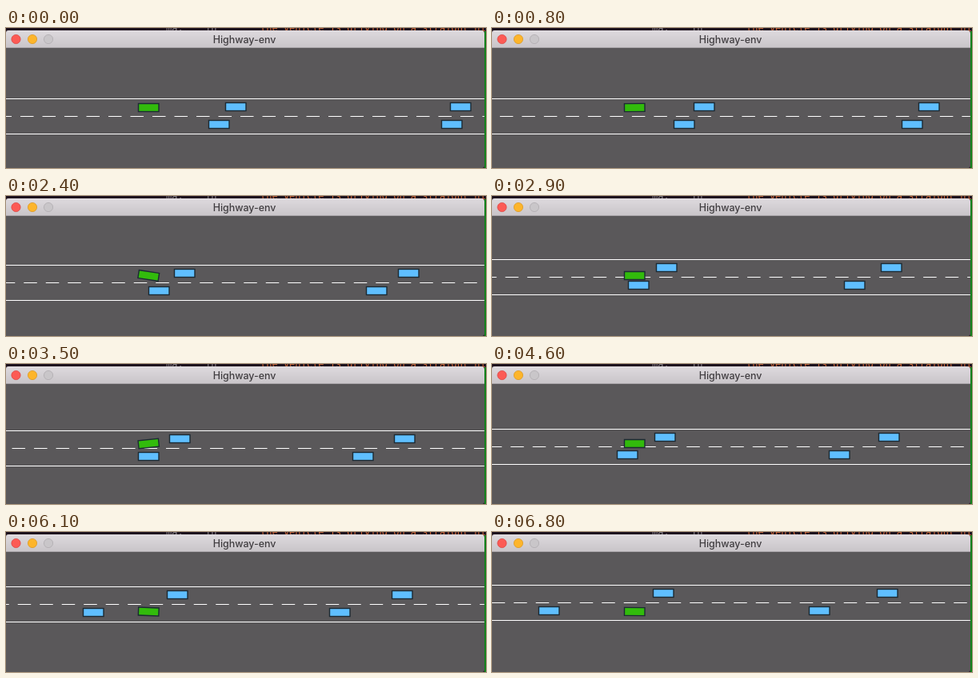
These frames come from a looping animation (600x175 px, 6900 ms). An HTML page with a canvas:

```html
<!DOCTYPE html>
<html lang="en">
<head>
<meta charset="utf-8">
<title>Highway-env</title>
<style>
html, body { margin: 0; width: 100%; height: 100%; overflow: hidden; background: #5a585a; }
canvas { display: block; }
</style>
</head>
<body>
<canvas id="stage" width="600" height="175"></canvas>
<script>
const ctx = document.getElementById('stage').getContext('2d');
const LOOP = 6900, STEP = 100;
const LANE = 22, CAR_W = 26.5, CAR_H = 11, ROAD_W = 598;
const DASH = 16.5, PERIOD = 27.5;
const CRUISE = 64, STEER = 0.55;

// Soft ramp: flat before `start`, slope 1 after it.
const ramp = (t, start) => 0.15 * Math.log(1 + Math.exp((t - start) / 0.15));

function ease(t, a, b) {
  const u = Math.min(1, Math.max(0, (t - a) / (b - a)));
  return u * u * (3 - 2 * u);
}

// Critically damped approach from 0 to 1.
function settle(t, start, tau) {
  const s = Math.max(0, t - start) / tau;
  return 1 - (1 + s) * Math.exp(-s);
}

// The ego car slows to the pace of the traffic ahead.
const braking = t => ramp(t, 2.5);
const travel = t => 78.9 * t - 18.2 * braking(t);
const upperX = t => 274 - 27.5 * t + 26.4 * braking(t);
const traffic = [
  { lane: 0, x: upperX },
  { lane: 0, x: t => upperX(t) + 280.5 },
  { lane: 1, x: t => 253 - 32 * t + 24 * braking(t) - 46.3 * ramp(t, 5.06) },
  { lane: 1, x: t => 544 - 40 * t + 28.9 * braking(t) }
];

// Swerve right, back left, right again, then settle in the lower lane.
const roadTop = t => 88 + ease(t, 0.2, 1.5)
  - 10 * ease(t, 2.1, 2.9) + 8 * ease(t, 3, 4)
  - 6 * ease(t, 4, 4.6) - 15 * settle(t, 4.85, 0.35);

function heading(t) {
  const slope = (roadTop(t + 0.01) - roadTop(t - 0.01)) / 0.02;
  return -STEER * slope / CRUISE;
}

function rect(color, x, y, w, h) {
  ctx.fillStyle = color;
  ctx.fillRect(x, y, w, h);
}

function panel(fill, y, h, radii) {
  ctx.fillStyle = fill;
  ctx.beginPath();
  ctx.roundRect(0, y, ROAD_W, h, radii);
  ctx.fill();
}

function carBody(color, x, y) {
  rect(color, x + 0.5, y + 0.5, CAR_W - 1, CAR_H - 1);
  ctx.strokeStyle = '#1c2a33';
  ctx.lineWidth = 1.4;
  ctx.strokeRect(x + 0.5, y + 0.5, CAR_W - 1, CAR_H - 1);
}

function button(x, fill, edge) {
  ctx.beginPath();
  ctx.arc(x, 14, 5.6, 0, 7);
  ctx.fillStyle = fill;
  ctx.fill();
  ctx.strokeStyle = edge;
  ctx.lineWidth = 0.8;
  ctx.stroke();
}

function drawDesktop() {
  rect('#1d111d', 0, 0, 600, 175);
  ctx.font = '12px "DejaVu Sans Mono", monospace';
  ctx.textAlign = 'left';
  ctx.fillStyle = '#8b858b';
  ctx.fillText('ma:', 200, 4);
  ctx.fillText('in', 249, 4);
  ctx.fillStyle = '#cf6a3a';
  ctx.fillText('the vehicle is driving on a straight hi', 318, 4);
  rect('#12801a', 598, 4, 2, 171);
}

function drawWindow() {
  const bar = ctx.createLinearGradient(0, 3, 0, 25);
  bar.addColorStop(0, '#dedade');
  bar.addColorStop(1, '#c8c4c8');
  panel(bar, 3, 30, [3, 4, 0, 0]);
  panel('#5a585a', 25, 150, [0, 0, 3, 0]);
  rect('#a9a5a9', 0, 24, ROAD_W, 1);
  button(12.5, '#fc5b55', '#de4542');
  button(33, '#fdb52b', '#dc9a24');
  button(53, '#c9c6c9', '#b0adb0');
  ctx.font = '500 12.4px Inter, sans-serif';
  ctx.textAlign = 'center';
  ctx.fillStyle = '#403d40';
  ctx.fillText('Highway-env', 298, 19);
}

function drawRoad(t) {
  const top = Math.round(roadTop(t));
  rect('#fff', 0, top, ROAD_W, 1);
  rect('#fff', 0, top + 2 * LANE, ROAD_W, 1);
  const phase = ((18 - travel(t)) % PERIOD + PERIOD) % PERIOD;
  for (let x = phase - PERIOD; x < ROAD_W; x += PERIOD)
    rect('#fff', x, top + LANE, Math.min(DASH, ROAD_W - x), 1);
  for (const car of traffic)
    carBody('#5fbfff', Math.round(car.x(t)), top + 5 + car.lane * LANE);
}

function drawEgo(t) {
  ctx.save();
  ctx.translate(178.25, 99.5);
  ctx.rotate(heading(t));
  carBody('#32bb0c', -CAR_W / 2, -CAR_H / 2);
  ctx.restore();
}

function frame(now) {
  const t = Math.floor((now % LOOP) / STEP) * STEP / 1000;
  drawDesktop();
  drawWindow();
  drawRoad(t);
  drawEgo(t);
  requestAnimationFrame(frame);
}
frame(0);
</script>
</body>
</html>
```
